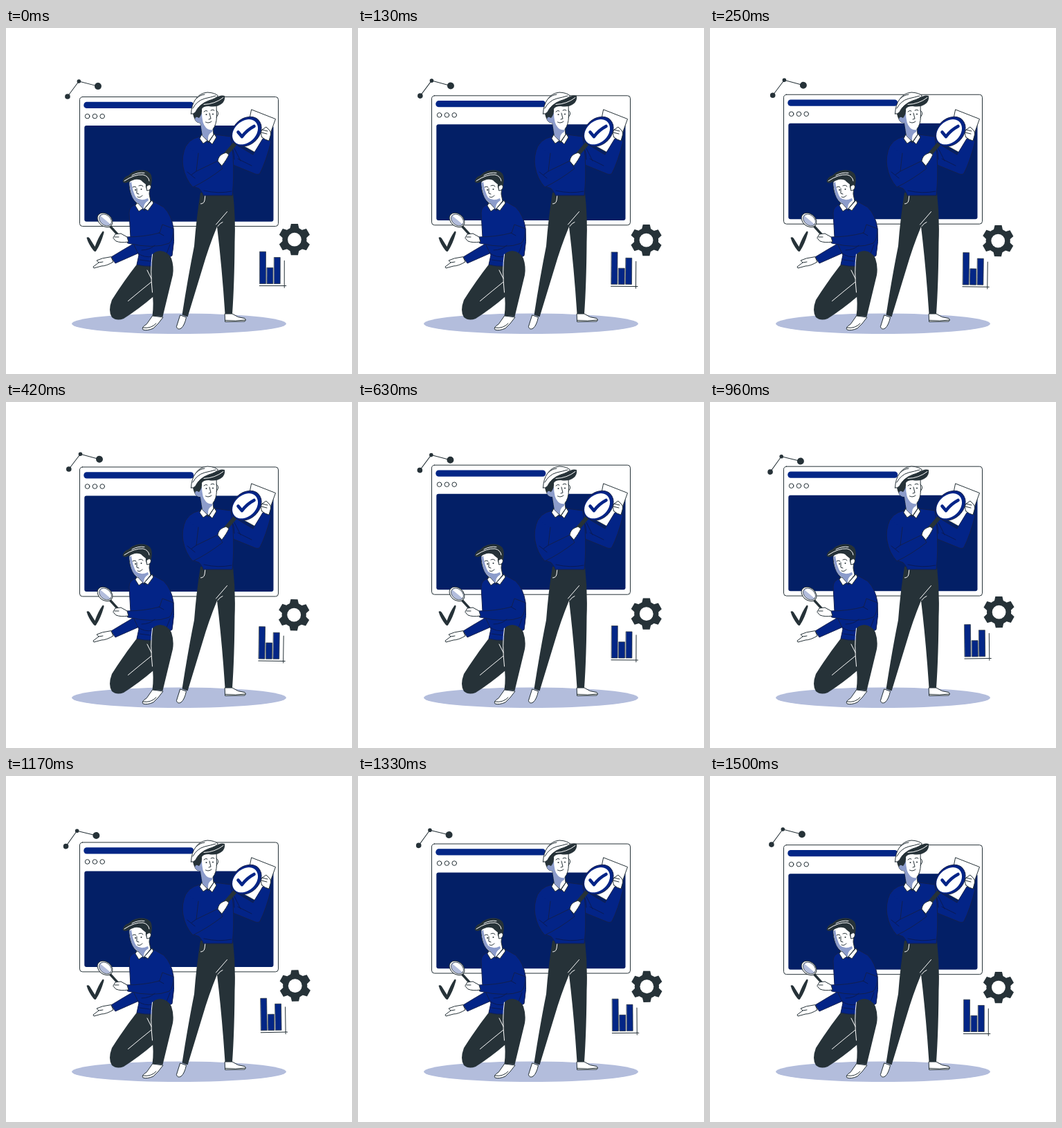
Animation, 500 px wide and 500 px high, one loop 1.54 s. Source, as an HTML page:

```html
<!DOCTYPE html>
<html lang="en">
<head>
<meta charset="utf-8">
<title>Quality check</title>
<style>
  html, body { margin: 0; width: 100%; height: 100%; overflow: hidden; background: #fff; }
  svg { display: block; width: 100%; height: 100%; }
  path, rect, ellipse, circle, polyline { stroke-linecap: round; stroke-linejoin: round; }
  .ink { fill: #263238; }
  .blue { fill: #032686; }
  .navy { fill: #031f66; }
  .shade { fill: #8c9ccb; }
  .paper { fill: #fff; stroke: #263238; stroke-width: 1; }
  .knit { fill: #032487; stroke: #12204f; stroke-width: 1; }
  .line { fill: none; stroke: #263238; stroke-width: 1; }
  .fold { fill: none; stroke: #0a1a55; stroke-width: 1; }
  .light { fill: none; stroke: #fff; stroke-width: 1; }
</style>
</head>
<body>
<svg viewBox="0 0 500 500">
  <ellipse cx="250" cy="427.3" rx="155" ry="14.8" fill="#b3bddc"/>

  <g id="screen">
    <rect class="paper" x="106.5" y="100" width="287" height="187" rx="4"/>
    <rect class="blue" x="112.3" y="107.3" width="159" height="9.2" rx="4.4"/>
    <g class="paper">
      <circle cx="117.6" cy="128" r="3.3"/>
      <circle cx="128.4" cy="128" r="3.3"/>
      <circle cx="139.2" cy="128" r="3.3"/>
    </g>
    <rect class="navy" x="113.3" y="141.5" width="273.2" height="138.6" rx="3"/>
  </g>

  <g id="icons">
    <polyline class="line" points="88.7,99.3 105,77.2 132.7,84.3"/>
    <g class="ink">
      <circle cx="88.7" cy="99.3" r="3.8"/>
      <circle cx="105.1" cy="77.2" r="2.8"/>
      <circle cx="132.7" cy="84.3" r="5"/>
    </g>
    <g id="gear" class="ink" transform="translate(417 305.4)">
      <circle r="17.6"/>
      <circle r="9.9" fill="#fff"/>
    </g>
    <g class="blue" stroke="#263238" stroke-width=".7">
      <rect x="367" y="323" width="8.6" height="46.4"/>
      <rect x="377.4" y="346.2" width="8.6" height="23.2"/>
      <rect x="387.8" y="331.3" width="8.6" height="38"/>
    </g>
    <path class="line" d="M366.5 372.3H405M402.4 336V375"/>
  </g>

  <!-- standing man -->
  <g>
    <path class="paper" d="M355 118L389.5 131.5L380 158L362 181L344 171Z"/>
    <path class="knit" d="M318 156Q329 158 335 170L357 183L371 160Q378 158 383 164Q376 192 367 210Q364 213 358 210L326 197Z"/>
    <path class="paper" d="M370 158Q367 152 370 147L376 143L379 146Q384 150 382 156L380 163Q375 162 370 158Z"/>
    <path class="line" d="M370 147L378 149M369 151L377 153"/>

    <path class="paper" d="M316.5 413H327Q335 419 345 419.5Q348 422 345 424L317 424.5Z"/>
    <path class="line" d="M317 422.5Q332 424 346 422"/>
    <path class="paper" d="M252 415L260.5 418Q258 430 253 434Q248 437 246.5 432Z"/>
    <path class="ink" d="M281 238L328 238Q332 275 330.5 310Q330 370 327 413H316.5Q312 345 305 287Q293 316 284 347L262.5 417.5L254.5 414.5Q263 360 272 315Q275 275 281 238Z"/>
    <path class="light" d="M281.5 254Q286 254 287 249L288 241M303.5 284L319.5 265.5M306 286.5Q309 282 313 280.5"/>

    <path class="knit" d="M280 157Q262 161 259 175L255.5 200L268 228L279 232Q285 239 285 242H327Q330 215 328 184L325 157L302 154L293 166Z"/>
    <path class="knit" d="M260 170Q253 186 256 201Q259 218 270 230Q291 220 313 203L306 192L275 207L278 181"/>
    <path class="fold" d="M275 207L268 212M330 174L339 192M326 170Q330 180 330 190M335 189L355 199M286 235Q307 240 326 236M262 208L273 217"/>
    <path class="paper" d="M283 154L293 165L301 153L304 158L298 168L292 162L285 167L280 160Z"/>

    <path class="paper" d="M280 121L279 130Q273 126 273 132Q275 137 281 137L284 156L293 164L300 154L299 146Q304 140 304.5 128L304 110L284 112Z"/>
    <path class="shade" d="M279 130Q273 126 273 132Q275 137 281 137L284 156L292 163Q291 153 298 150L299 147Q293 148 289 144Q283 138 283 122L280 124Z"/>
    <path class="ink" d="M270 124Q273 114 282 109Q294 102 303 101Q310 96 316 98Q317 106 311 110Q304 115 293 113Q285 113 283 117Q284 124 279 130Q274 126 273 132Q271 129 270 124Z"/>
    <path class="light" d="M286 110.5Q302 110 314 100.5"/>
    <path class="paper" d="M267.5 124Q268 111 274 103Q280 94 291 93Q302 93.5 306.5 98Q303 102 293 105Q279 110 273.5 122Q270 125 267.5 124Z"/>
    <path class="line" d="M270 116Q276 105 287 102Q296 100 303 98M275 102Q280 97 287 96"/>
    <path class="line" d="M286 121Q289 118 291 120M296 119Q299 117 301 119M294 123L296 131L293 132M288.5 136Q293 138.5 297 135"/>
    <path class="line" stroke-width=".6" d="M304 119Q308 122 306 126L304 129"/>
    <circle class="ink" cx="289.5" cy="125" r="1"/>
    <circle class="ink" cx="299" cy="124.4" r="1"/>

    <path d="M331 167L318 182" fill="none" stroke="#263238" stroke-width="6"/>
    <g transform="rotate(-43 347 150)">
      <ellipse class="knit" cx="347.5" cy="150" rx="24" ry="18.6"/>
      <ellipse cx="345.8" cy="149.2" rx="20.8" ry="15.4" fill="#fff"/>
    </g>
    <path d="M335.5 150.5L341 157Q348 147.5 358.5 142" fill="none" stroke="#032487" stroke-width="4.6"/>
    <path class="paper" d="M306 192Q307 185 313 182L318 180L322 183Q319 190 312 199Z"/>
  </g>

  <!-- kneeling man -->
  <g>
    <path class="ink" d="M191 339Q170 366 153 393Q147 409 153 418Q160 424 170 420Q192 406 213 388L216 345Z"/>
    <path class="paper" d="M212 416L227 418Q220 428 213 434Q204 438 198 436Q195 433 203 428Z"/>
    <path class="line" d="M198 433Q209 435 217 427"/>
    <path class="knit" d="M184 312L192 325L158 340L152 331Q170 320 184 312Z"/>
    <path class="paper" d="M152 331L155 338Q145 344 138 344L127 347L126 345L134 339L131 336L139 333Z"/>
    <path class="line" d="M134 339L140 338"/>
    <path class="knit" d="M190 254Q178 257 178 267L180 303L192 328L189 342Q200 345 212 344L240 329Q244 308 242 289Q239 270 228 259L212 250L200 264Z"/>
    <path class="knit" d="M174 302Q200 302 222 296L226 284L242 290Q242 305 236 311Q214 320 176 311Z"/>
    <path class="fold" d="M221 296L228 300M190 325Q200 333 212 330M193 335L208 337M215 314Q208 321 196 321M237 313L232 326"/>
    <path class="ink" d="M211 329Q213 323 223 322Q234 323 239 333Q243 345 241 357L226.5 417L211.5 416Q214 397 211 380Z"/>
    <path class="light" d="M211.5 327Q208 350 211.5 382M176.5 394.5Q195 379 210 367M204 350L210 362"/>
    <path class="paper" d="M190 252L199 262L211 249L213 253L205 264L199 260L192 265L187 257Z"/>

    <path class="paper" d="M178 223Q178 236 183 245Q187 253 192 254L199 262L209 250L207 240L208 226L204 216L184 217Z"/>
    <path class="shade" d="M178 225L181 222Q183 237 188 245Q195 251 205 246L206 249Q198 254 199 262L191 253Q184 250 181 240Z"/>
    <path class="ink" d="M168.5 222Q170 215 177 213Q182 207 192 205.5Q206 204 210 213Q212 221 209 230L204 233Q201 231 202 226L197 222Q194 218 186 219L178 222Q171 226 168.5 222Z"/>
    <path class="light" d="M171 221Q186 211 198 212Q206 214 207 221M182 213Q191 208 200 209.5"/>
    <path class="paper" d="M203 229Q208 224 209.5 229Q209 235 204 235Z"/>
    <path class="line" d="M183 230Q186 228 188 230M192 228Q196 226 198 229M189 232L189 239L192 240M190 244Q194 246 197 242"/>
    <circle class="ink" cx="187" cy="234" r="1"/>
    <circle class="ink" cx="195.5" cy="233" r="1"/>

    <path d="M150 286L161 298" fill="none" stroke="#263238" stroke-width="3.4"/>
    <g transform="rotate(40 143 277.5)">
      <ellipse class="paper" cx="143" cy="277.5" rx="12" ry="9"/>
      <ellipse cx="143.4" cy="277.2" rx="10" ry="7.2" fill="#b3bddc" stroke="#263238" stroke-width=".7"/>
      <path d="M134.5 277Q136 270.5 143.4 270.5Q152 271 152.5 277Z" fill="#fff"/>
    </g>
    <path class="paper" d="M155 303L158 298L166 297L175 302L177 309Q166 311 159 308Z"/>
    <path class="line" d="M157 302L163 302"/>
  </g>

  <path class="ink" d="M116.5 303Q119 301 121 304L128.5 316Q133 303 139.5 294Q142 293 141.5 296Q137 312 130 322.5Q128 324 126 321Q119 312 116.5 303Z"/>
</svg>
<script>
  const LOOP = 1540;
  const PERIOD = 1510;
  const START = 0.022;
  const screenGroup = document.getElementById("screen");
  const icons = document.getElementById("icons");
  const gear = document.getElementById("gear");

  for (const angle of [0, 60, 120]) {
    gear.insertAdjacentHTML("afterbegin",
      `<path d="M-5 -22.6H5L7 -14V14L5 22.6H-5L-7 14V-14Z" transform="rotate(${angle})"/>`);
  }

  // Linear wave from 0 up to 1 at a quarter turn, down to -1 and back.
  const triangle = p => 1 - 4 * Math.abs((p + 0.25) % 1 - 0.5);

  function draw(now) {
    const phase = (now % LOOP / PERIOD + START) % 1;
    const lift = 10 * (1 - Math.abs(2 * phase - 1));
    screenGroup.setAttribute("transform", `translate(0 ${-lift})`);
    icons.setAttribute("transform", `rotate(${triangle(phase)} 250 250)`);
  }

  const begin = performance.now();
  function tick() {
    draw(performance.now() - begin);
    requestAnimationFrame(tick);
  }
  tick();
</script>
</body>
</html>
```
